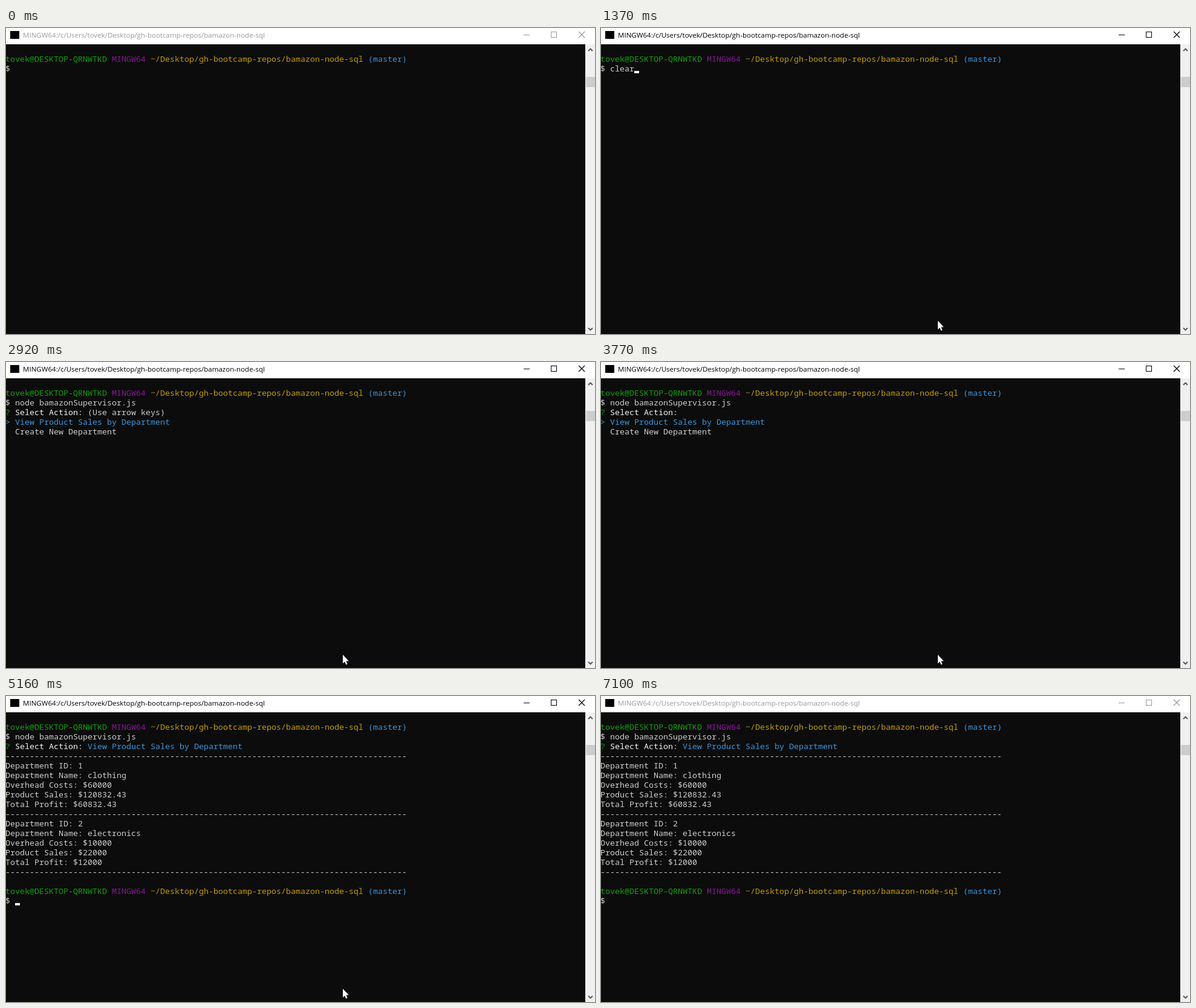
Write an HTML page with a canvas that moves like this. It is 974 px wide and 507 px high and loops after 7.27 s.

```html
<!DOCTYPE html>
<html lang="en">
<head>
<meta charset="utf-8">
<title>Terminal session</title>
<style>
  html, body { margin: 0; width: 100%; height: 100%; overflow: hidden; background: #0c0c0c; }
  canvas { display: block; }
</style>
</head>
<body>
<canvas id="stage" width="974" height="507"></canvas>
<script>
const ctx = document.getElementById('stage').getContext('2d');
const LOOP = 7270, BLINK = 530, STEP = 76;
const CELL = 8, ROW = 16, LEFT = -1, TOP = 27;
const WHITE = '#cccccc', BRIGHT = '#f2f2f2', GREEN = '#13a10e',
      PURPLE = '#881798', YELLOW = '#c19c00', CYAN = '#3a96dd';

// Moments of the session, in ms
const FOCUS = 140, RECALL = 1370, COMMAND = 1680, RUN = 1980, MENU = 2920,
      DOWN = 3450, UP = 3770, REPORT = 4550, DONE = 4700, BLUR = 7100;
const ENTER = 220, LEAVE = 6260;

const USER = 'tovek', HOST = 'DESKTOP-QRNWTKD';
const REPO = 'Desktop/gh-bootcamp-repos/bamazon-node-sql';
const TITLE = `MINGW64:/c/Users/${USER}/${REPO}`;
const PROMPT = [[`${USER}@${HOST} `, GREEN], ['MINGW64 ', PURPLE], [`~/${REPO} `, YELLOW], ['(master)', CYAN]];
const QUESTION = [['? ', GREEN], ['Select Action: ', BRIGHT]];
const CHOICES = ['View Product Sales by Department', 'Create New Department'];
const RULE = '-'.repeat(83);

const department = (id, name, costs, sales, profit) => [
  `Department ID: ${id}`,
  `Department Name: ${name}`,
  `Overhead Costs: $${costs}`,
  `Product Sales: $${sales}`,
  `Total Profit: $${profit}`,
  RULE
];
const SUMMARY = [
  RULE,
  ...department(1, 'clothing', '60000', '120832.43', '60832.43'),
  ...department(2, 'electronics', '10000', '22000', '12000')
];

function box(x, y, w, h, color) {
  ctx.fillStyle = color;
  ctx.fillRect(x, y, w, h);
}

function line(points, color, width = 1) {
  ctx.strokeStyle = color;
  ctx.lineWidth = width;
  ctx.beginPath();
  for (const [x, y] of points) ctx.lineTo(x, y);
  ctx.stroke();
}

function print(row, ...parts) {
  let col = 0;
  for (const [text, color = WHITE] of parts) {
    ctx.fillStyle = color;
    ctx.fillText(text, LEFT + col * CELL, TOP + row * ROW + 13);
    col += text.length;
  }
}

function drawTitleBar(active) {
  const ink = active ? '#000000' : '#999999';
  box(0, 0, 974, 27, '#ffffff');
  box(7, 5, 15, 13, '#000000');
  ctx.font = '11.56px "Open Sans", "Noto Sans", sans-serif';
  ctx.fillStyle = ink;
  ctx.fillText(TITLE, 28, 16);
  box(856, 11, 10, 1, ink);
  ctx.strokeStyle = ink;
  ctx.lineWidth = 1;
  ctx.strokeRect(901.5, 6.5, 9, 9);
  line([[947, 6], [957, 16]], ink, 1.2);
  line([[957, 6], [947, 16]], ink, 1.2);
}

function drawScrollBar() {
  box(958, 27, 1, 480, '#ffffff');
  box(959, 27, 15, 480, '#f0f0f0');
  box(959, 81, 15, 17, '#cdcdcd');
  for (const [y, rise] of [[38, -3.5], [497, 3.5]])
    line([[963, y], [966.5, y + rise], [970, y]], '#505050', 1.8);
}

function drawMenu(t) {
  const picked = t >= DOWN && t < UP ? 1 : 0;
  print(3, ...QUESTION, [t < DOWN ? '(Use arrow keys)' : '']);
  CHOICES.forEach((text, i) =>
    print(4 + i, i === picked ? ['> ' + text, CYAN] : ['  ' + text]));
}

function drawReport() {
  print(3, ...QUESTION, [CHOICES[0], CYAN]);
  SUMMARY.forEach((text, i) => print(4 + i, [text]));
}

// Blinks from the given moment on, lit first
function drawCaret(t, since, col, row) {
  if (Math.floor((t - since) / BLINK) % 2 === 0)
    box(LEFT + col * CELL, TOP + row * ROW + 12, CELL, 4, BRIGHT);
}

function drawTerminal(t) {
  const command = t < RECALL ? '' : t < COMMAND ? 'clear' : 'node bamazonSupervisor.js ';
  box(0, 27, 958, 480, '#0c0c0c');
  ctx.font = '13.3333px "Noto Sans Mono", "DejaVu Sans Mono", monospace';
  print(1, ...PROMPT);
  print(2, ['$ ' + command]);
  if (t >= REPORT) drawReport();
  else if (t >= MENU) drawMenu(t);
  if (t >= DONE) {
    print(18, ...PROMPT);
    print(19, ['$']);
  }
  if (t < FOCUS || t >= BLUR) return;
  if (t < RUN) drawCaret(t, t < COMMAND ? -70 : RUN - BLINK, 2 + command.length, 2);
  else if (t >= DONE) drawCaret(t, DONE - 60, 2, 19);
  else if (t >= REPORT) drawCaret(t, REPORT, 0, 17);
}

// Quadratic curve sampled in equal steps, as the screen was refreshed
function glide(t, start, steps, from, bend, to) {
  const u = Math.max(0, Math.min(1, Math.floor((t - start) / STEP) / steps));
  return from.map((p, i) => (1 - u) ** 2 * p + 2 * u * (1 - u) * bend[i] + u * u * to[i]);
}

function drawPointer(t) {
  if (t < ENTER || t >= LEAVE + 6 * STEP) return;
  const [x, y] = t < LEAVE
    ? glide(t, ENTER, 7, [450, 480], [449, 290], [557, 485])
    : glide(t, LEAVE, 5, [599, 481], [770, 462], [924, 476]);
  ctx.fillStyle = '#ffffff';
  ctx.beginPath();
  for (const [dx, dy] of [[0, 0], [0, 14.5], [3.2, 11.4], [5.4, 16.5], [7.5, 15.6], [5.4, 10.6], [9.7, 10.4]])
    ctx.lineTo(Math.round(x) + dx, Math.round(y) + dy);
  ctx.fill();
}

function draw(t) {
  drawTerminal(t);
  drawScrollBar();
  drawTitleBar(t >= FOCUS && t < BLUR);
  drawPointer(t);
}

const start = performance.now();
function tick() {
  draw((performance.now() - start) % LOOP);
  requestAnimationFrame(tick);
}
tick();
</script>
</body>
</html>
```
